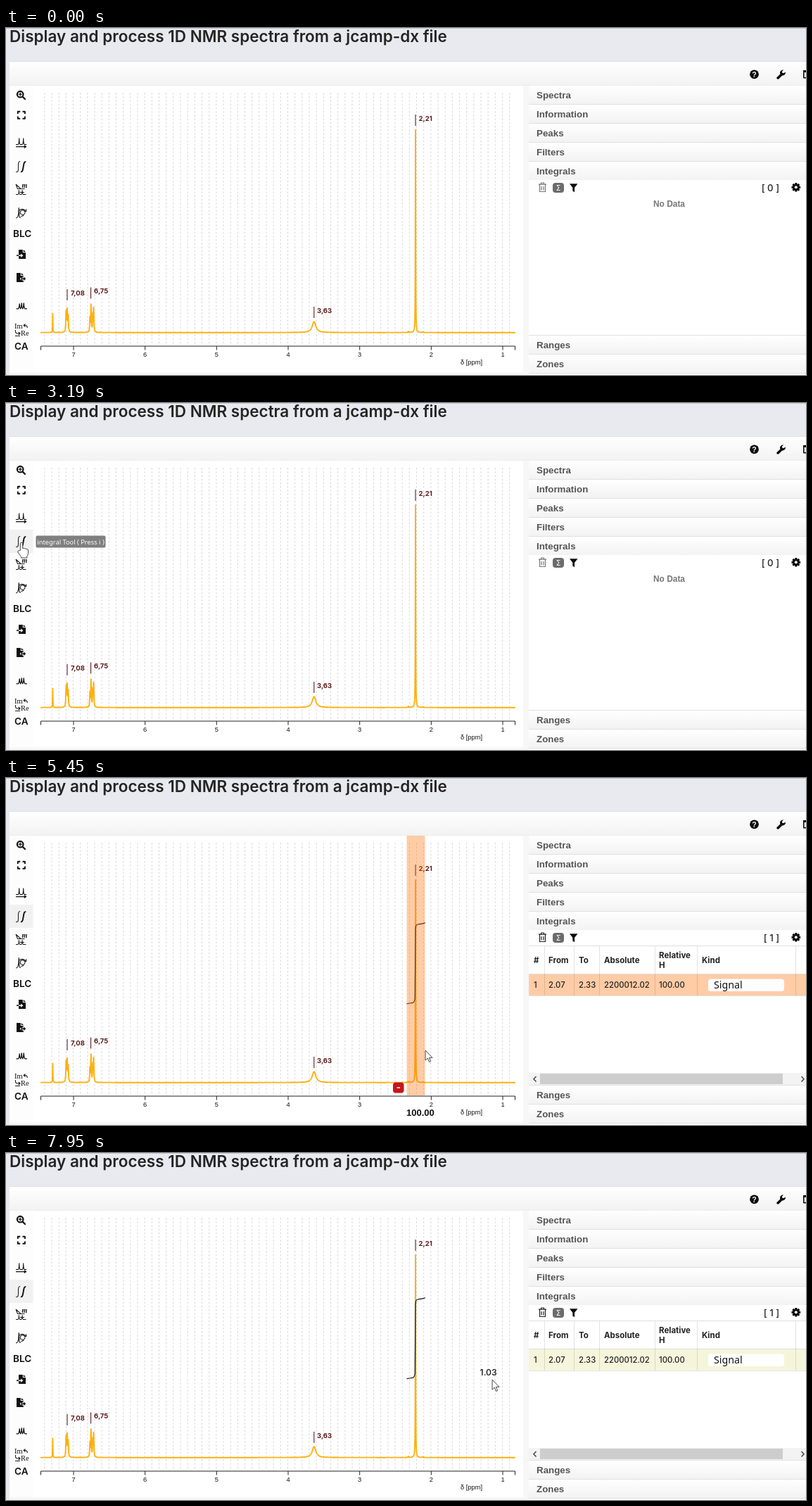
Recreate the animation shown at these times as an HTML page with a canvas. Size 1137 by 493 pixels, loop 8000 ms.

```html
<!DOCTYPE html>
<html lang="en">
<head>
<meta charset="utf-8">
<title>1D NMR spectra</title>
<style>
html, body { margin: 0; width: 100%; height: 100%; overflow: hidden; background: #fff; }
canvas { display: block; }
</style>
</head>
<body>
<canvas id="stage" width="1137" height="493"></canvas>
<script>
const LOOP = 8000;
const ctx = document.getElementById('stage').getContext('2d');
const UI = 'Montserrat, Inter, sans-serif';
const ARIAL = '"Liberation Sans", Arial, sans-serif';
const NOTO = '"Noto Sans", "Open Sans", sans-serif';
const GOLD = '#ffb00d', WINE = '#5c1a1a';

// ---- drawing helpers ----
function rect(x, y, w, h, color) {
  ctx.fillStyle = color;
  ctx.fillRect(x, y, w, h);
}
function round(x, y, w, h, r, color) {
  ctx.fillStyle = color;
  ctx.beginPath();
  ctx.roundRect(x, y, w, h, r);
  ctx.fill();
}
function disc(x, y, r, color) {
  ctx.fillStyle = color;
  ctx.beginPath();
  ctx.arc(x, y, r, 0, 7);
  ctx.fill();
}
function text(str, x, y, font, color = '#222', align = 'left') {
  ctx.font = font;
  ctx.fillStyle = color;
  ctx.textAlign = align;
  ctx.fillText(str, x, y);
}
function stroke(d, color = '#111', width = 1, x = 0, y = 0) {
  ctx.save();
  ctx.translate(x, y);
  ctx.strokeStyle = color;
  ctx.lineWidth = width;
  ctx.stroke(new Path2D(d));
  ctx.restore();
}
function fill(d, color = '#111', x = 0, y = 0) {
  ctx.save();
  ctx.translate(x, y);
  ctx.fillStyle = color;
  ctx.fill(new Path2D(d));
  ctx.restore();
}
function shade(y, h, from, to) {
  const g = ctx.createLinearGradient(0, y, 0, y + h);
  g.addColorStop(0, from);
  g.addColorStop(1, to);
  return g;
}

// ---- timing ----
// Bursts of movement: start, end, number of steps.
const BURSTS = [
  [0, 0, 1], [200, 970, 11], [1050, 1050, 1], [1220, 1540, 5], [2330, 2330, 1],
  [3190, 3190, 1], [3410, 3560, 3], [4120, 4120, 1], [4290, 5070, 11],
  [5310, 5450, 3], [5990, 6460, 7], [7490, 7950, 7]
];
function snap(t) {
  const [a, b, n] = BURSTS.filter(s => s[0] <= t).pop();
  if (t >= b) return b;
  const step = (b - a) / (n - 1);
  return a + Math.floor((t - a) / step + 1e-6) * step;
}

// Pointer path: time, x, y.
const PATH = [
  [200, 931, 479], [970, 27, 211], [1050, 20, 213], [1140, 20, 212], [1540, 22, 198.5],
  [3335, 22, 198.5], [3535, 570, 387], [4212, 570, 387], [4836, 594, 387], [5070, 596, 387],
  [5900, 596, 387], [6068, 774, 319], [6460, 975, 290], [7480, 975, 290],
  [7490, 973, 288], [7950, 691, 322]
];
function pointer(t) {
  const i = PATH.findIndex(k => k[0] >= t);
  if (i < 0) return PATH[PATH.length - 1].slice(1);
  if (i === 0) return PATH[0].slice(1);
  const [a, x0, y0] = PATH[i - 1], [b, x1, y1] = PATH[i];
  let p = (t - a) / (b - a);
  if (b < 7900) p = p * p * (3 - 2 * p);
  return [x0 + (x1 - x0) * p, y0 + (y1 - y0) * p];
}

// ---- chart ----
const xOf = ppm => 95.5 + (7 - ppm) * 101.67;
const ppmOf = x => 7 - (x - 95.5) / 101.67;

// Lines of the spectrum: centre, height, half width.
const PEAKS = [
  [66.4, 27, .25], [85.4, 28, .45], [86.9, 32, .5], [88.4, 22, .45],
  [119.3, 20, .4], [120.8, 38, .45], [123.3, 24, .4], [124.5, 34, .45],
  [437.8, 15.5, 3.1], [571.8, 1.5, .5], [582, 288, .25], [592.6, 1, .5]
];
function drawSpectrum() {
  ctx.beginPath();
  for (let x = 49; x <= 724; x += .2) {
    let y = 432.7;
    for (const [c, h, w] of PEAKS) y -= h / (1 + ((x - c) / w) ** 2);
    ctx.lineTo(x, y);
  }
  ctx.strokeStyle = GOLD;
  ctx.lineWidth = 1.9;
  ctx.lineJoin = 'round';
  ctx.stroke();
}
function peakLabel(str, x, y, tx) {
  stroke(`M${x} ${y}v16`, WINE, 1.1);
  text(str, tx, y + 8.6, '700 9.5px ' + UI, WINE);
}
function drawChart() {
  rect(39, 82, 696, 407, '#fff');
  ctx.setLineDash([2.6, 2.6]);
  for (let i = 9; i <= 74; i++) stroke(`M${xOf(i / 10)} 92V450`, '#d6d6d6', 1);
  ctx.setLineDash([]);
  drawSpectrum();
  peakLabel('7,08', 87, 371, 92);
  peakLabel('6,75', 120.6, 368.5, 125);
  peakLabel('3,63', 437.8, 396, 442);
  peakLabel('2,21', 582, 123, 586.5);
  stroke('M49.5 457.5V452H723.5V457.5', '#222', 1);
  for (let p = 1; p <= 7; p++) {
    stroke(`M${xOf(p) + .5} 452v5.5`, '#222', 1);
    text(p, xOf(p) + .5, 467, '9.3px ' + ARIAL, '#111', 'center');
  }
  text('δ [ppm]', 646, 477.5, '9.3px ' + ARIAL, '#111');
}
const drawIntegral = () =>
  stroke('M569.5 321C573 319.5 575 320 578 319.3Q581 318.5 581.3 312L582 214Q582.3 208.5 585 208C589 207 592 207.5 595.8 205.8', '#111', 1.2);

// ---- left tools ----
function drawFile(y, out) {
  const x = out ? 15 : 18;
  fill('M0 0h5.8v3.9h4.2v9.1h-10zM6.8 0l3.2 3h-3.2z', '#111', x, y);
  if (out) {
    fill('M20 7h3.8v-2.4l4.8 3.7-4.8 3.7v-2.4h-3.8z', '#fff', 0, y);
    fill('M21 7.6h4v-2l3.4 2.7-3.4 2.7v-2h-4z', '#111', 0, y);
  } else {
    fill('M18 7.4h3.2v-2l3.2 2.8-3.2 2.8v-2h-3.2z', '#fff', 0, y);
    rect(15, y + 7.4, 3, 1.6, '#111');
  }
}
function drawTools(active) {
  if (active) rect(5, 180, 33.5, 33, '#f1f1f1');
  ctx.lineCap = 'round';
  stroke('M24.5 94.2a4.3 4.3 0 1 0 -8.6 0a4.3 4.3 0 1 0 8.6 0M23.6 97.6l3.4 3.4', '#111', 2.2);
  stroke('M18.2 94.2h4M20.2 92.2v4', '#111', 1.3);
  ctx.lineCap = 'butt';
  stroke('M16.8 122v-3.2h3.4M23.5 118.8h3.4v3.2M26.9 125.5v3.2h-3.4M20.2 128.7h-3.4v-3.2', '#111', 1.9);
  // peak picking
  stroke('M14 165.5h3.2q1.2-.5 1.5-7q.3 6.5 1.5 7h3q1.2-.5 1.5-7q.3 6.5 1.5 7h3M14 168.6h14M25.8 166.8l2.8 1.8-2.8 2M18.7 156.5v2M24.7 156.5v2', '#111', 1.2);
  // integration
  stroke('M14 204.5h1.3q2.2 0 2.2-4v-7q0-4 2.7-4', '#222', 1.1);
  stroke('M21 204.2q2 .8 2.9-3l1.5-8.2q.8-3.8 2.9-2.6', '#111', 1.9);
  // multiplets
  stroke('M14 222l7 6.5M14 222l2.5 6.5h10M14 236.5h3q1.2-.5 1.4-6q.3 5.5 1.4 6h2q1-.5 1.3-6q.4 5.5 1.4 6h4M20 233.5h6', '#222', 1.1);
  text('m', 22.5, 227, 'italic 700 10px "Liberation Serif", serif', '#111');
  // phase correction
  stroke('M14 270q3.5 0 3.9-8l.4-6.5.6 12q.3 2.4 2 1.2', '#222', 1.2);
  stroke('M27 262a3.4 3.4 0 1 0 -6.8 0a3.4 3.4 0 1 0 6.8 0M19 259q4.6-4 9.5 1.2M28.7 257.2v3.3h-3M21.5 268l4-2', '#222', 1.1);
  text('BLC', 10, 297, '600 13.6px ' + UI, '#111');
  drawFile(315, false);
  drawFile(348, true);
  stroke('M14.5 398.8h3q1.2-1 1.7-7q.4 6 1.5 7q1.1-1 1.5-8q.4 7 1.5 8q1.1-1 1.5-8q.5 7 1.7 8h3', '#111', 1.3);
  text('Im', 12, 427, '10.5px "Liberation Serif", serif', '#111');
  text('Re', 21, 437.3, '10.5px "Liberation Serif", serif', '#111');
  stroke('M25.5 422.5h2.5q2.3.5 2.3 3.5M27.5 420.5l-2.4 2 2.4 2M13.5 429v3q.5 2 3 2h3M17.7 432l2.4 2-2.4 2M13 437.5h7', '#222', 1.1);
  text('CA', 12, 457.2, '600 13.6px ' + UI, '#111');
}

// ---- page and side panel ----
function drawPage() {
  rect(0, 0, 1137, 493, '#e9eaef');
  rect(0, 0, 1137, 1, '#c4c5ca');
  text('Display and process 1D NMR spectra from a jcamp-dx file', 5, 20.3, '600 22.5px ' + UI, '#242424');
  rect(5, 47, 1132, 446, '#fdfdfd');
  rect(5, 47, 1132, 35, shade(48, 34, '#ffffff', '#f2f2f2'));
  rect(5, 47, 1132, 1, '#dedfe3');
  rect(5, 81, 1132, 1, '#ededed');
  disc(1063.5, 65.8, 6.4, '#0c0c0c');
  text('?', 1063.5, 69.7, '700 10.5px ' + ARIAL, '#fff', 'center');
  stroke('M1097 71.2l5.5-5.5', '#0c0c0c', 3.4);
  fill('M1107.8 62.4a4.2 4.2 0 0 1-5.8 4.8l-1.8-2a4.3 4.3 0 0 1 4.8-5.7l-2.2 2.4.5 1.9 2 .5z', '#0c0c0c');
  disc(1097, 71, 1.8, '#0c0c0c');
  stroke('M1140 60.8h-6.2v10h6.2', '#0c0c0c', 1.6);
  rect(1133, 60, 4, 3, '#0c0c0c');
  rect(735, 82, 8, 411, '#f7f7f7');
  rect(5, 489, 730, 4, '#f7f7f7');
}
function panelHeader(label, y) {
  rect(743, y, 394, 27, shade(y, 27, '#ffffff', '#f2f2f2'));
  rect(743, y + 26, 394, 1, '#e0e0e0');
  text(label, 754, y + 18.2, '700 13.33px ' + ARIAL, '#555');
}
function drawTable(hover) {
  rect(743, 238, 394, 1, '#dedede');
  rect(743, 278, 394, 1, '#dedede');
  rect(743, 279, 394, 30, hover ? '#ffcca6' : '#f5f5dc');
  rect(743, 309, 394, 1, '#e4e4e4');
  for (const x of [765, 807, 843, 922, 982, 1122]) rect(x, 239, 1, 70, 'rgba(0,0,0,.11)');
  const head = '700 11.5px ' + UI, cell = '500 11.3px ' + UI;
  const cols = [['#', '1', 750], ['From', '2.07', 771], ['To', '2.33', 814], ['Absolute', '2200012.02', 850], ['', '100.00', 928], ['Kind', '', 989]];
  for (const [name, value, x] of cols) {
    text(name, x, 263, head);
    text(value, x, 298.3, cell);
  }
  text('Relative', 928, 256, head);
  text('H', 928, 270, head);
  round(998, 285.5, 108, 17.5, 4, '#fff');
  text('Signal', 1006, 299.3, '14.2px ' + NOTO, '#111');
  rect(743, 419, 394, 17, '#f3f3f3');
  rect(759, 420, 345, 15, '#cdcdcd');
  stroke('M753.5 424l-3.6 3.7 3.6 3.7M1130.5 424l3.6 3.7-3.6 3.7', '#444', 1.5);
}
function drawPanel(filled, hover) {
  ['Spectra', 'Information', 'Peaks', 'Filters', 'Integrals'].forEach((s, i) => panelHeader(s, 82 + 27 * i));
  rect(743, 216, 394, 221, '#fff');
  const ink = filled ? '#222' : '#777';
  stroke('M757 222.2h11M760.5 222v-2h4v2M758.5 222.5v10h8v-10M761 225v5.5M764 225v5.5', ink, 1.2);
  round(777, 220, 16, 14, 4, '#6c6c6c');
  text('Σ', 785, 231, '10.5px "DejaVu Sans", sans-serif', '#fff', 'center');
  fill('M801 221.3h11.5l-4.4 5.4v6.6l-2.8-1.9v-4.7z', '#0c0c0c');
  ctx.save();
  ctx.translate(1122.8, 226.3);
  for (let i = 0; i < 4; i++) {
    ctx.rotate(Math.PI / 4);
    rect(-1.5, -6.3, 3, 12.6, '#0c0c0c');
  }
  ctx.restore();
  disc(1122.8, 226.3, 4.8, '#0c0c0c');
  disc(1122.8, 226.3, 2, '#fff');
  text(filled ? '[ 1 ]' : '[ 0 ]', 1099, 231.7, '500 13.2px ' + UI, '#222', 'right');
  if (filled) drawTable(hover);
  else text('No Data', 942.5, 254, '700 11.9px ' + ARIAL, '#777', 'center');
  rect(743, 436, 394, 1, '#e0e0e0');
  panelHeader('Ranges', 437);
  panelHeader('Zones', 464);
}

// ---- overlays ----
function drawHover() {
  rect(569.5, 82, 26, 369, 'rgba(255,110,0,.35)');
  round(550, 432.5, 15.5, 15, 4, '#c4161c');
  rect(555.5, 439.2, 4.5, 1.5, '#fff');
  text('100.00', 569, 480, '700 13px ' + ARIAL, '#111');
}
function drawTooltip(alpha) {
  ctx.globalAlpha = alpha;
  round(42.5, 188.5, 99, 17, 2, '#7f7f7f');
  text('integral Tool ( Press i )', 92, 200.8, '9.3px ' + NOTO, '#fff', 'center');
  ctx.globalAlpha = 1;
}
function drawPointer(x, y) {
  const hand = x < 38;
  const d = hand
    ? 'M-1.7 11V1.2Q-1.5-.2 0-.2T1.7 1.2V8q1.6-1 2.8.5q1.6-.8 2.6.6q2-.6 2.4 1.4v4.5q-.2 3-1.7 4.2v2.3h-8.3v-1.5l-4.6-6.5q-.6-2 1.3-2.2z'
    : 'M0 0V14.2L3.3 11.2 5.6 16.5 7.7 15.6 5.4 10.4H10z';
  fill(d, '#fff', x, y);
  stroke(d, '#333', .9, x, y);
}

function draw(now) {
  const t = snap(now % LOOP);
  const [x, y] = pointer(t);
  const active = t >= 3190, filled = t >= 5310;
  const overBand = x > 569 && x < 597 && y > 82 && y < 452;
  const overRow = x > 743 && y > 279 && y < 309;
  const hover = t >= 5380 && (overBand || overRow);

  drawPage();
  drawTools(active);
  drawChart();
  if (filled) drawIntegral();
  drawPanel(filled, hover);
  if (hover) drawHover();
  if (t >= 4290 && t < 5310) rect(569.5, 82, Math.max(0, x - 570.5), 407, 'rgba(0,0,0,.1)');
  if (t >= 1220 && t < 3410) drawTooltip(Math.min(1, (t - 1140) / 400));
  if (t > 6060 && t < 6130) {
    disc(472.3, 423.3, 7.3, '#ee1c1c');
    rect(467.5, 421.8, 9.6, 3, '#fff');
  }

  const [px, py] = pointer(t - 18.8);
  if (active && px > 40 && px < 735 && !hover && (t > 5900 || t >= 3410 && t < 4290)) {
    text(ppmOf(px).toFixed(2), px - 29, py - 4.6, '500 12.3px ' + UI, '#111');
  }
  if (t >= 2330 && t < 3190) disc(21.5, 199.5, 11.5, 'rgba(255,245,40,.55)');
  if (t >= 4120 && t < 5310) disc(x - .5, 386.5, 11.5, 'rgba(255,245,40,.55)');
  if (t >= 200) drawPointer(x, y);
}

function frame() {
  draw(performance.now());
  requestAnimationFrame(frame);
}
frame();
</script>
</body>
</html>
```
